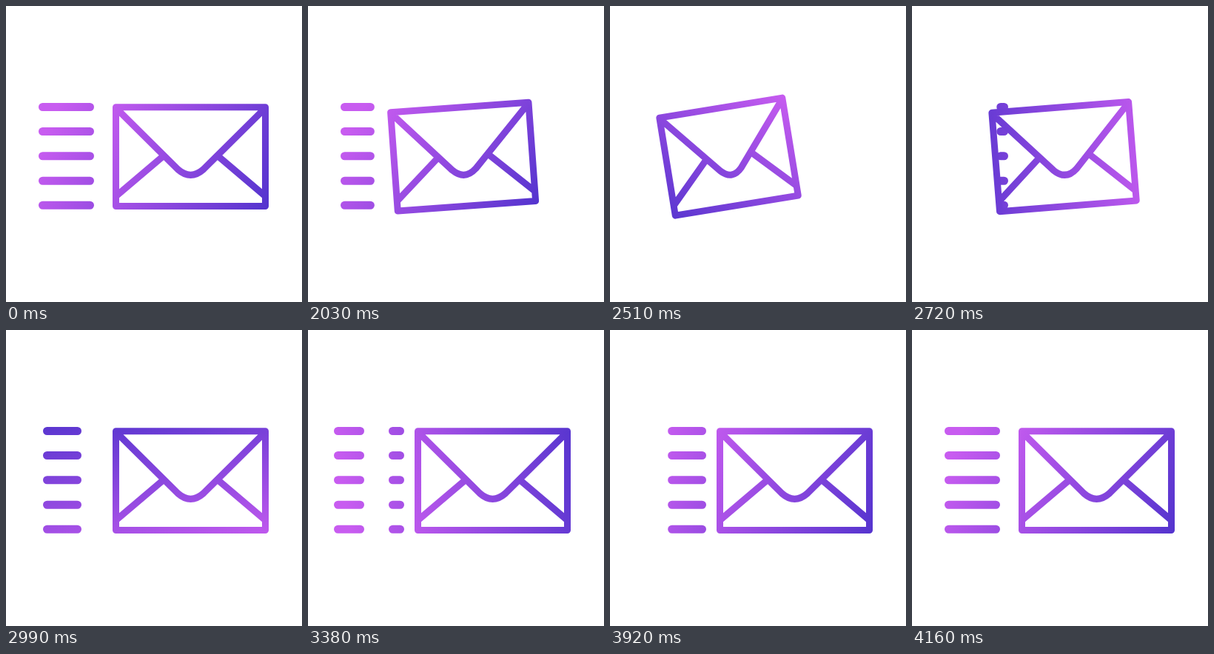
These frames come from a looping animation (400 by 400 pixels, 4.22 s). An HTML page with a canvas:

```html
<!DOCTYPE html>
<html lang="en">
<head>
<meta charset="utf-8">
<title>Sending mail</title>
<style>
  html, body { margin: 0; width: 100%; height: 100%; overflow: hidden; background: #fff; }
  canvas { display: block; width: 100vw; height: 100vh; }
</style>
</head>
<body>
<canvas id="stage" width="400" height="400"></canvas>
<script>
const ctx = document.getElementById('stage').getContext('2d');

const LOOP = 4220, HOLD = 2030, STEP = 30, LAST = 4160;
const PINK = '#c85cf0', INDIGO = '#5434ce';
const MID_Y = 203.25;
const ROWS = [136.5, 169.5, 202.75, 236.25, 269.25];
const TRACK = { from: 40.5, to: 124.5, period: 85 };
const REST = { x: 49.5, len: 64 };
const DASH = 41;

// Tables of [time, value]
const PULL = [[2030, .455], [2270, .84], [2480, 1], [2540, .99], [2740, .45], [2940, 0]];
const SPIN = [[2030, 42], [2510, 120], [2990, 260], [3380, 345], [3710, 375], [4160, 389]];
const FLOW = [[2700, 124.5], [2990, 55.5], [3380, -55.5], [3710, -122.5], [4160, -205.5]];

function slope(keys, i) {
  if (i === keys.length - 1) return 0;
  const a = keys[Math.max(i - 1, 0)], b = keys[i + 1];
  return (b[1] - a[1]) / (b[0] - a[0]);
}

// Smooth curve through the keys, held at both ends
function at(keys, t) {
  if (t <= keys[0][0]) return keys[0][1];
  const i = keys.findIndex(k => k[0] > t) - 1;
  if (i < 0) return keys[keys.length - 1][1];
  const [t0, v0] = keys[i], [t1, v1] = keys[i + 1];
  const d = t1 - t0, u = (t - t0) / d, w = 1 - u;
  return v0 * w * w * (1 + 2 * u) + v1 * u * u * (3 - 2 * u)
    + d * u * w * (slope(keys, i) * w - slope(keys, i + 1) * u);
}

function gradient(cx, deg) {
  const a = deg * Math.PI / 180;
  const dx = 140 * Math.cos(a), dy = 112 * Math.sin(a);
  const g = ctx.createLinearGradient(cx - dx, MID_Y - dy, cx + dx, MID_Y + dy);
  g.addColorStop(0, PINK);
  g.addColorStop(1, INDIGO);
  return g;
}

function drawEnvelope(pull, deg) {
  const cx = 249.5 - 87.7 * pull;
  ctx.save();
  ctx.translate(cx, MID_Y);
  ctx.rotate(-9.1 * pull * Math.PI / 180);
  ctx.scale(1 - .165 * pull, 1);
  ctx.beginPath();
  ctx.rect(-101, -66.5, 202, 133.75);
  ctx.moveTo(-101, -65.5);
  ctx.lineTo(-17, 17.75);
  ctx.quadraticCurveTo(0, 32.5, 17, 17.75);
  ctx.lineTo(101, -65.5);
  for (const side of [-1, 1]) {
    ctx.moveTo(side * 37.5, 0);
    ctx.lineTo(side * 100, 53);
  }
  ctx.restore();
  ctx.lineWidth = 9;
  ctx.lineCap = 'butt';
  ctx.strokeStyle = gradient(cx - 10, deg);
  ctx.stroke();
}

function addDash(x, len) {
  const a = Math.max(x, TRACK.from), b = Math.min(x + len, TRACK.to);
  if (b - a < .5) return;
  for (const y of ROWS) {
    ctx.moveTo(a, y);
    ctx.lineTo(b, y);
  }
}

function drawLines(t, pull, deg) {
  ctx.beginPath();
  if (t < 2540) {
    addDash(REST.x, REST.len * (1 - pull));
  } else {
    const x = at(FLOW, t);
    for (let k = 0; k < 4; k++) addDash(x + k * TRACK.period, k === 3 ? REST.len : DASH);
  }
  ctx.lineWidth = 11;
  ctx.lineCap = 'round';
  ctx.strokeStyle = gradient(185, deg);
  ctx.stroke();
}

function draw(time) {
  const still = time < HOLD;
  const t = still ? 0 : Math.min(LAST, HOLD + STEP * Math.floor((time - HOLD) / STEP));
  const pull = still ? 0 : at(PULL, t);
  const deg = still ? 30 : at(SPIN, t);
  ctx.fillStyle = '#fff';
  ctx.fillRect(0, 0, 400, 400);
  ctx.lineJoin = 'round';
  drawLines(t, pull, deg);
  drawEnvelope(pull, deg);
}

const start = performance.now();
function tick() {
  draw((performance.now() - start) % LOOP);
  requestAnimationFrame(tick);
}
tick();
</script>
</body>
</html>
```
